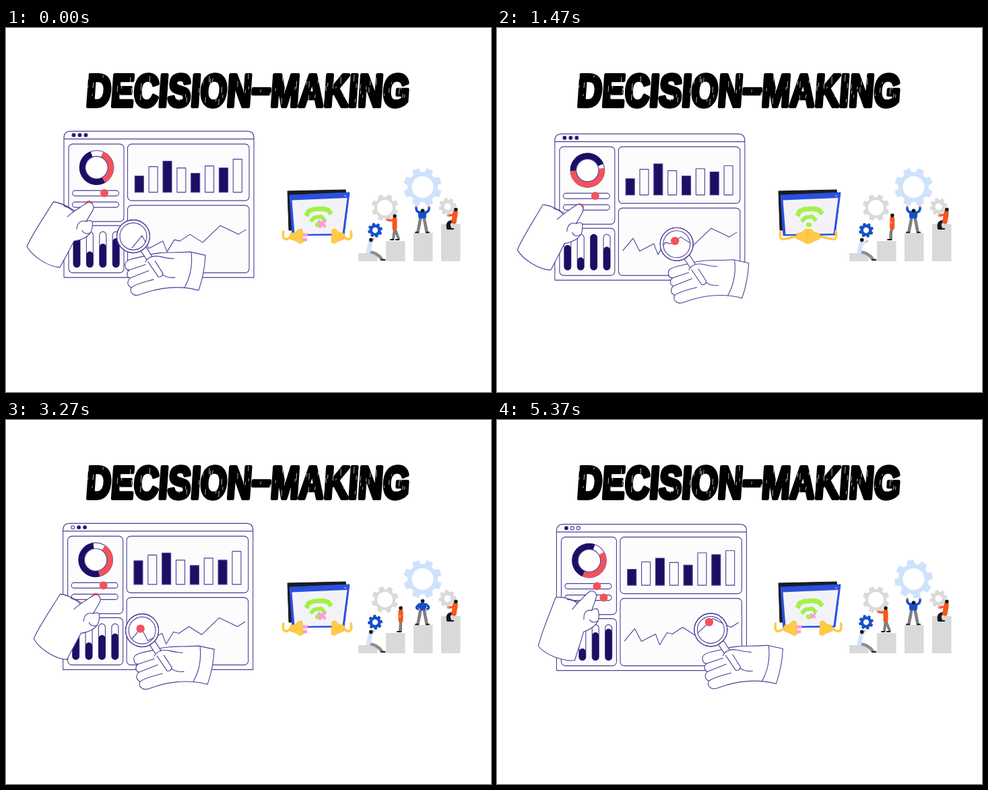
Recreate the animation shown at these times as an HTML page. Size 720 by 540 pixels, loop 5410 ms.

```html
<!DOCTYPE html>
<html lang="en">
<head>
<meta charset="utf-8">
<title>Decision-making</title>
<style>
  html, body { margin: 0; width: 100%; height: 100%; overflow: hidden; background: #fff; }
  svg { display: block; width: 720px; height: 540px; }
  .ink { fill: none; stroke: #4a3f97; stroke-width: 1.1; stroke-linejoin: round; stroke-linecap: round; }
  .ink.paper { fill: #fff; }
  .ink.card { fill: #fcfcfd; }
  .navy { fill: #1b0f63; }
  .red { fill: #f2525c; }
  .limb { fill: none; stroke-linecap: round; stroke-linejoin: round; }
  .title { font: 700 67px "Liberation Sans", Arial, sans-serif; stroke: #000; stroke-width: 6; stroke-linejoin: round; }
</style>
</head>
<body>
<svg id="stage" viewBox="0 0 720 540" xmlns="http://www.w3.org/2000/svg"></svg>
<script>
const LOOP = 5410, STEP = LOOP / 162;
const PANEL = 3000, PLUG = 3340;
const TAU = Math.PI * 2;
const NAVY = '#1b0f63', BLUE = '#1650c8', YELLOW = '#ffca45', GREEN = '#a5f04c';
const stage = document.getElementById('stage');

function set(node, attrs) {
  for (const key in attrs) node.setAttribute(key, attrs[key]);
  return node;
}
function add(parent, tag, attrs = {}) {
  const node = document.createElementNS('http://www.w3.org/2000/svg', tag);
  parent.appendChild(node);
  return set(node, attrs);
}
const group = (parent, attrs) => add(parent, 'g', attrs);
const path = (parent, d, attrs) => add(parent, 'path', { d, ...attrs });
const move = (node, x, y, extra = '') => set(node, { transform: `translate(${x} ${y}) ${extra}` });

// Smooth 0-to-1 rise between two times, and a rise followed by a fall.
function ease(time, from, to) {
  const k = Math.min(1, Math.max(0, (time - from) / (to - from)));
  return k * k * (3 - 2 * k);
}
const hold = (time, a, b, c, d) => ease(time, a, b) - ease(time, c, d);
const mix = (a, b, k) => a + (b - a) * k;
const bell = x => Math.exp(-((x / 130) ** 2));

function makeTitle() {
  const text = add(stage, 'text', { class: 'title', transform: 'translate(118 116) skewX(-4) scale(.758 1)' });
  const part = (content, dy) => { add(text, 'tspan', { dy }).textContent = content; };
  part('DECISION', 0);
  part('–', -4);
  part('MAKING', 4);

  let seed = 11;
  const random = () => (seed = (seed * 16807) % 2147483647) / 2147483647;
  let flecks = '';
  for (let i = 0; i < 80; i++) {
    flecks += `M${122 + random() * 470} ${68 + random() * 38}l${-random()} ${3 + random() * 8}`;
  }
  path(stage, flecks, { stroke: '#fff', 'stroke-width': 0.7 });
}

function makeDashboard() {
  const root = group(stage);
  path(root, 'M0 217V10Q0 0 10 0H272Q282 0 282 10V217Z', { class: 'ink paper' });
  path(root, 'M0 11.5H282', { class: 'ink' });
  const dots = [0, 1, 2].map(i => add(root, 'circle', { cx: 14.5 + 9 * i, cy: 5.8, r: 2.5, class: 'ink' }));

  const box = (x, y, width, height, rx = 6, kind = 'card') =>
    add(root, 'rect', { x, y, width, height, rx, class: `ink ${kind}` });
  box(7, 19, 82, 115);
  box(7, 140, 82, 70);
  box(94.5, 19, 180.5, 84);
  box(94.5, 110, 180.5, 100);

  const donut = group(root, { transform: 'translate(48.5 54)' });
  add(donut, 'circle', { r: 25.3, class: 'ink paper' });
  const [navyArc, redArc] = [NAVY, '#f2525c'].map(stroke =>
    add(donut, 'circle', { r: 21, fill: 'none', stroke, 'stroke-width': 9, pathLength: 360 }));
  add(donut, 'circle', { r: 16.7, class: 'ink paper' });
  const showArc = (node, from, to) =>
    set(node, { 'stroke-dasharray': `${to - from} 360`, transform: `rotate(${from - 90})` });

  box(12.5, 88, 69, 8, 4, 'paper');
  box(12.5, 105, 69, 8, 4, 'paper');
  add(root, 'circle', { cx: 60, cy: 92, r: 6, class: 'red' });
  const knob = add(root, 'circle', { cy: 109, r: 6, class: 'red' });

  const heights = [24, 38, 46, 36, 28, 39, 36, 49];
  const bars = heights.map((h, i) =>
    add(root, 'rect', { x: 105.3 + 20.85 * i, width: 13, class: 'ink', style: i % 2 ? '' : `fill:${NAVY}` }));

  const pills = [0, 1, 2, 3].map(i => {
    const x = 14 + 19.4 * i;
    box(x, 149, 10, 53, 5, 'paper');
    return add(root, 'rect', { x, width: 10, rx: 5, class: 'navy' });
  });

  const chart = [[101, 173], [116, 155], [126, 174], [147, 163], [153, 179], [164, 161], [172, 163],
    [187, 153], [206, 165], [232, 140], [259, 153], [270, 146]];
  const drawChart = parent => add(parent, 'polyline', { points: chart.join(' '), class: 'ink' });
  const chartY = x => {
    const i = Math.max(1, chart.findIndex(point => point[0] >= x));
    const [ax, ay] = chart[i - 1], [bx, by] = chart[i];
    return mix(ay, by, (x - ax) / (bx - ax));
  };
  drawChart(root);

  const pointer = group(root);
  path(pointer, 'M-53 -4C-66 18 -82 40 -92 62C-84 77 -60 92 -43 93C-36 80 -28 66 -22 54' +
    'C-12 53 -2 48 2 42C5 38 6 30 5 25C3 23 -1 23 -4 25L6 8C9 1 4 -5 -2 -3C-10 1 -16 7 -21 9' +
    'C-30 4 -42 -4 -53 -4Z', { class: 'ink paper' });
  path(pointer, 'M-21 9L-32 18M-4 25C-12 22 -17 27 -18 36M-37 2C-30 4 -25 7 -23 11M2 42C-3 44 -8 43 -10 38',
    { class: 'ink' });

  const clip = add(add(root, 'clipPath', { id: 'lens-view' }), 'circle', { r: 20 });
  const lensBack = add(root, 'circle', { r: 24.5, class: 'ink paper' });
  const view = group(root, { 'clip-path': 'url(#lens-view)' });
  drawChart(view);
  const marker = add(view, 'circle', { class: 'red' });

  const glass = group(root);
  path(glass, 'M-12 44C-14 38 -8 35 0 33L22 28C40 22 60 25 84 23L107 28C106 50 102 66 97 80' +
    'C70 73 45 75 20 83L8 87C-1 89 -6 82 -3 76C-9 73 -10 67 -5 62C-10 60 -11 54 -6 50C-10 50 -12 48 -12 44Z',
    { class: 'ink paper' });
  path(glass, 'M-6 50L18 42M-5 62L23 51M-3 76C4 70 16 68 30 64M86 24C88 42 85 60 76 76M40 54C46 60 54 62 62 61',
    { class: 'ink' });
  path(glass, 'M11 21.5L37 60Q43 61 44 55L19 16Z', { class: 'ink paper' });
  path(glass, 'M18 38C22 31 30 28 40 30C48 32 54 33 60 33', { class: 'ink paper' });
  add(glass, 'circle', { r: 24.5, class: 'ink' });
  add(glass, 'circle', { r: 20, class: 'ink' });

  return time => {
    const p = time % PANEL, half = p % (PANEL / 2), a = TAU * p / PANEL;
    const wave = peak => Math.cos(a - TAU * peak / PANEL);
    move(root, 86 - 2.5 * Math.sin(a), 155.1 - 2 * Math.cos(a));

    dots.forEach((dot, i) => {
      const since = half - 150 - 250 * i;
      dot.style.fill = since > 0 && since < 700 ? '#fff' : NAVY;
    });

    const turn = ((1 - Math.cos(a)) / 2) ** 0.8;
    const redEnd = 150 + 118 * turn;
    showArc(redArc, 22 + 60 * Math.min(1, turn * 1.4), redEnd);
    showArc(navyArc, redEnd, 340 + 88 * turn);

    bars.forEach((bar, i) => {
      const since = half - 270 - 110 * i;
      const height = heights[i] + 11 * bell(since) - 6 * bell(since - 400);
      set(bar, { y: 90.5 - height, height });
    });

    [160 - 5 * wave(0), 181 - 5 * wave(500), 158 + 9 * wave(0), 163 + 8 * wave(1000)]
      .forEach((y, i) => set(pills[i], { y, height: 202 - y }));

    const knobX = 55 - 18 * Math.cos(2 * a + 0.06);
    set(knob, { cx: knobX });
    move(pointer, knobX, 109, `rotate(${-11 * hold(half, 680, 850, 1350, 1500)} -43 93)`);

    const x = mix(103 + 0.053 * Math.min(p, 2480), 103, ease(p, 2450, PANEL));
    const y = 156 + 8 * Math.max(0, Math.sin(Math.PI * p / 2450));
    for (const node of [clip, lensBack]) set(node, { cx: x, cy: y });
    move(glass, x, y);
    set(marker, { cx: x - 2.5, cy: chartY(x - 2.5), r: 6.2 * hold(p, 100, 210, 2480, 2580) });
  };
}

function makeNetwork() {
  const root = group(stage);
  path(root, 'M418 242L504 240L505 247L424 300L420 300Z', { fill: '#191b26', stroke: '#191b26' });
  path(root, 'M421 248L510 244L502 307L425 308Z', { fill: '#2b50de', stroke: '#2b50de', 'stroke-linejoin': 'round' });
  path(root, 'M424.5 255.5L506.5 252L499.5 305L428.5 306Z', { fill: '#f3f3f7' });
  path(root, 'M502 247.5l3 3m0 -3l-3 3', { stroke: '#b9c7ff', 'stroke-width': 0.8 });

  const wifi = group(root, { transform: 'translate(0 1)' });
  const band = (d, width) =>
    path(wifi, d, { fill: 'none', stroke: GREEN, 'stroke-width': width, 'stroke-linejoin': 'round' });
  const outer = band('M446 278L449 271L456 268L470 267L478 269L483 275', 7);
  const inner = band('M452 286L458 280L468 279L474 285', 6);
  add(wifi, 'ellipse', { cx: 463, cy: 291, rx: 4.2, ry: 3.4, fill: GREEN });
  const cross = path(root, 'M-5 -4L5 4M5 -5L-4 5', { stroke: '#f99fd6', 'stroke-width': 4.2 });

  const plugs = [1, -1].map(side => {
    const half = group(root, { transform: `translate(462 0) scale(${side} 1)` });
    const cord = path(half, '', { class: 'limb', stroke: YELLOW, 'stroke-width': 3.6 });
    const body = group(half);
    if (side > 0) path(body, 'M8 -2H16M8 5H15', { stroke: '#f99fd6', 'stroke-width': 5 });
    path(body, 'M-10 -4L-2 -6L3 -11L8 -10L9 9L5 11L-2 7L-10 4Z', { fill: YELLOW, stroke: '#f6bd35', 'stroke-width': 0.8 });
    return { cord, body };
  });

  return time => {
    const p = time % PLUG;
    const joined = hold(p, 400, 860, 1600, 2200);
    const gap = mix(30, 7, joined), anchor = mix(50, 41, joined);
    plugs.forEach(({ cord, body }) => {
      set(cord, { d: `M${-anchor} 302q-3 13 6 11L${-gap - 9} 309` });
      move(body, -gap, 309);
    });
    outer.style.display = p > 850 && p < 1180 ? 'none' : '';
    inner.style.display = p > 850 && p < 1060 ? 'none' : '';
    move(cross, 469, 290.5, `scale(${1.1 * (1 - hold(p, 950, 1180, 1900, 2120))})`);
  };
}

function makeTeam() {
  const root = group(stage);
  [334, 316, 304, 291].forEach((y, i) =>
    add(root, 'rect', { x: 523 + 41 * i, y, width: 28.5, height: 346 - y, fill: '#d9d9d9' }));

  function makeGear(radius, hole, color) {
    const points = [];
    for (let i = 0; i < 32; i++) {
      const corner = i % 4;
      const r = corner === 1 || corner === 2 ? radius : radius * 0.78;
      const a = TAU * (Math.floor(i / 4) + 0.5) / 8 + [-0.27, -0.17, 0.17, 0.27][corner];
      points.push(`${r * Math.cos(a)} ${r * Math.sin(a)}`);
    }
    return path(root, `M${points.join('L')}ZM${hole} 0A${hole} ${hole} 0 1 0 ${-hole} 0A${hole} ${hole} 0 1 0 ${hole} 0Z`,
      { fill: color, 'fill-rule': 'evenodd' });
  }
  const big = makeGear(28.8, 16, '#cfe2fc');
  const middle = makeGear(20, 11.5, '#dadada');
  const right = makeGear(13.2, 5, '#dadada');
  const small = makeGear(11, 4.2, BLUE);

  const limb = (stroke, width) => path(root, '', { class: 'limb', stroke, 'stroke-width': width });
  const skin = () => add(root, 'circle', { r: 1.5, fill: '#f3a28a' });
  const hair = () => add(root, 'circle', { r: 2.8, fill: '#15161c' });
  const line = (node, from, to, bend = [0, 0]) => {
    const mid = from.map((v, i) => (v + to[i]) / 2 + bend[i]);
    set(node, { d: `M${from}Q${mid} ${to}` });
  };

  // A figure follows from hip, lean, hand and foot; knee and elbow are bends.
  function makePerson(shirt, trousers, build) {
    const legs = [limb(trousers, 4), limb(trousers, 4)];
    const shoes = [limb('#15161c', 2.2), limb('#15161c', 2.2)];
    const torso = limb(shirt, build), arm = limb(shirt, 3.2);
    const palm = skin(), head = hair();
    return ({ hip, lean, hand, foot, knee, toe, spread }) => {
      const tilt = lean * TAU / 360;
      const along = length => [hip[0] + length * Math.sin(tilt), hip[1] - length * Math.cos(tilt)];
      const neck = along(13), top = along(18);
      line(torso, neck, hip);
      line(arm, neck, hand, [0, 3]);
      set(palm, { cx: hand[0], cy: hand[1] });
      set(head, { cx: top[0], cy: top[1] });
      legs.forEach((leg, i) => {
        const [x, y] = [foot[0] + spread * i, foot[1]];
        line(leg, hip, [x, y], knee);
        line(shoes[i], [x, y + 1], [x + toe, y + 1]);
      });
    };
  }
  const sitter = makePerson('#cfe3fb', '#8b8b8b', 6.5);
  const pusher = makePerson('#f4571d', '#808080', 7);
  const watcher = makePerson('#f4571d', '#16182a', 7.5);
  watcher({ hip: [665, 287], lean: 9, hand: [656, 278], foot: [656, 297], knee: [-7, -6], toe: 5, spread: 3 });

  path(root, 'M615 284L611.5 302M621 284L624.5 302', { class: 'limb', stroke: '#808080', 'stroke-width': 4.6 });
  path(root, 'M612 303.3H608M624 303.3H628', { class: 'limb', stroke: '#15161c', 'stroke-width': 2 });
  path(root, 'M613.5 274Q618 271 622.5 274L622 281H614Z',
    { fill: BLUE, stroke: BLUE, 'stroke-width': 3.5, 'stroke-linejoin': 'round' });
  const arms = [-1, 1].map(side => ({ side, sleeve: limb(BLUE, 3.6), palm: skin() }));
  const lifterHead = set(hair(), { cx: 618.5 });

  return time => {
    const swing = Math.sin(TAU * time / 2700);
    const nudge = 3 * hold(time, 4300, 4670, 4700, 5100);
    move(big, 618.5, 236, `rotate(${12 * ease(time, 3400, 4670)})`);
    move(middle, 562.5, 266.5, `rotate(${4 * swing})`);
    move(right, 655.5, 265, `rotate(${10 + 6 * swing})`);
    move(small, 548 + nudge, 300 + nudge, `rotate(${8 + 10 * swing})`);

    const rest = hold(time, 1200, 1700, 2600, 3200), tuck = hold(time, 3500, 3900, 4800, 5250);
    sitter({
      hip: [538, 332], lean: 12, hand: [mix(545.5, 552, rest) + nudge / 2, mix(313, 319, rest)],
      foot: [mix(557, 547, tuck), 343], knee: [3, -5], toe: 4, spread: 1.5
    });

    const push = 1 - hold(time, 500, 850, 4150, 4600), back = hold(time, 500, 850, 1100, 1600);
    pusher({
      hip: [586 - 9 * push + 4 * back, 297 - 6 * back], lean: 3 * back,
      hand: [585 - 20 * push + 2 * back, 291 - 7 * push - 14 * back],
      foot: [585 - 10 * push - 5 * back, 313], knee: [-9 * back, -7 * back], toe: -4, spread: 1 + 7 * push
    });

    const up = 1 - hold(time, 2500, 2900, 4800, 5200);
    arms.forEach(({ side, sleeve, palm }) => {
      const x = 618.5 + side * mix(5, 9.5, up), y = mix(281, 266, up);
      line(sleeve, [618.5 + side * 5, 273.5], [x, y], [side * mix(8, 3, up), 2]);
      set(palm, { cx: x, cy: y - 1.5 * up });
    });
    set(lifterHead, { cy: mix(268.5, 271, up) });
  };
}

makeTitle();
const parts = [makeDashboard(), makeNetwork(), makeTeam()];

function render(elapsed) {
  const time = Math.floor(((elapsed % LOOP) + 7) / STEP) * STEP % LOOP;
  parts.forEach(update => update(time));
}

let start;
function tick(now) {
  start ??= now;
  render(Math.max(0, now - start));
  requestAnimationFrame(tick);
}
render(0);
requestAnimationFrame(tick);
</script>
</body>
</html>
```
